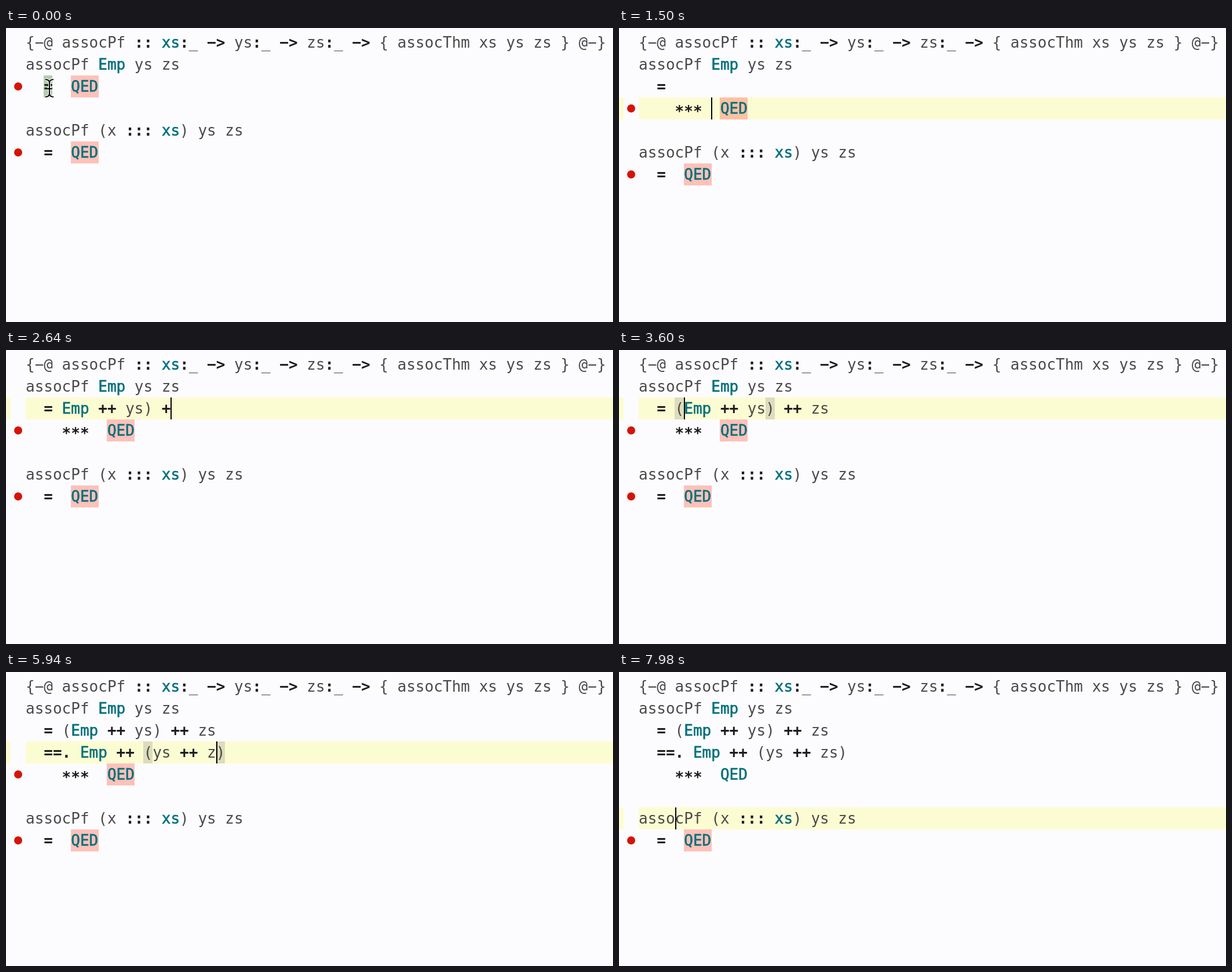
An HTML page with a canvas that plays this animation: 1048x508 px, repeating every 8000 ms.

```html
<!DOCTYPE html>
<html lang="en">
<head>
<meta charset="utf-8">
<title>Proof editing</title>
<style>
html, body { margin: 0; width: 100%; height: 100%; overflow: hidden; background: #fcfcfe; }
canvas { display: block; }
</style>
</head>
<body>
<canvas id="stage" width="1048" height="508"></canvas>
<script>
const ctx = document.getElementById('stage').getContext('2d');
const LOOP = 8000, LEFT = 34, TOP = 6, ROW = 38, CHAR = 15.653;
const FONT = '26px "DejaVu Sans Mono", monospace';
const PAPER = '#fcfcfe', CURRENT = '#fcfcd3', TEAL = '#00707c', INK = '#4a4a4a', OPERATOR = '#1c1c1c';
const START = [
  '{-@ assocPf :: xs:_ -> ys:_ -> zs:_ -> { assocThm xs ys zs } @-}',
  'assocPf Emp ys zs',
  '  =  QED',
  '',
  'assocPf (x ::: xs) ys zs',
  '  =  QED'
];
const TOKENS = /(Emp|QED|(?<=:: )xs)|(->|[:=+*.]+)|\w+|\S/g;
const FOCUS = 360, INSERT = 900, CHECKED = 7080;

// Editing steps, each a function of the editor state at a given time.
const steps = [];
const at = (time, run) => steps.push({ time, run });
const move = (time, row, col) => at(time, ed => { ed.row = row; ed.col = col; });
const insert = (ed, text) => {
  const line = ed.lines[ed.row];
  ed.lines[ed.row] = line.slice(0, ed.col) + text + line.slice(ed.col);
  ed.col++;
};
const type = (time, pace, text, autoClose) => [...text].forEach((ch, i) =>
  at(time + i * pace, ed => insert(ed, autoClose && ch === '(' ? '()' : ch)));
const newline = (time, indent) => at(time, ed => {
  const line = ed.lines[ed.row];
  ed.lines.splice(ed.row, 1, line.slice(0, ed.col), ' '.repeat(indent) + line.slice(ed.col));
  ed.row++;
  ed.col = indent;
});

move(FOCUS, 2, 3);
move(INSERT, 2, 4);
newline(1080, 4);
type(1260, 80, '*** ');
move(1740, 2, 4);
type(1860, 90, 'Emp');
type(2160, 60, ' ++ ys) ++ zs');
move(3180, 2, 4);
type(3480, 60, '(');
move(3840, 2, 21);
newline(4020, 2);
type(4260, 90, '==. ');
type(4740, 85, 'Emp ++ (ys ++ z', true);
type(6060, 60, 's');
move(6300, 3, 23);
move(6960, 4, 12);
move(7140, 5, 0);
move(7320, 6, 4);

function editorAt(time) {
  const ed = { lines: [...START], row: 2, col: 2 };
  for (const step of steps) if (step.time <= time) step.run(ed);
  return ed;
}

const x = col => LEFT + col * CHAR;
const y = row => TOP + row * ROW;
function box(color, left, top, width, height = ROW) {
  ctx.fillStyle = color;
  ctx.fillRect(Math.floor(left), top, width, height);
}

function matchBracket(line, col) {
  const pos = [col - 1, col].find(i => '()'.includes(line[i] || ' '));
  if (pos === undefined) return [];
  const dir = line[pos] === '(' ? 1 : -1;
  for (let i = pos, depth = 0; i >= 0 && i < line.length; i += dir) {
    depth += line[i] === '(' ? 1 : line[i] === ')' ? -1 : 0;
    if (depth === 0) return [pos, i];
  }
  return [];
}

function drawLine(line, row, hasError) {
  if (hasError) {
    box('rgba(255, 120, 100, 0.45)', x(line.indexOf('QED')), y(row), 48);
    ctx.fillStyle = '#d51408';
    ctx.beginPath();
    ctx.arc(21, y(row) + 19, 7, 0, 7);
    ctx.fill();
  }
  for (const { 0: word, 1: name, 2: op, index } of line.matchAll(TOKENS)) {
    const glyphs = word.replace('-', '\u2212');
    const baseline = y(row) + (word[0] === '*' ? 33 : 28);
    ctx.font = op ? 'bold ' + FONT : FONT;
    ctx.fillStyle = ctx.strokeStyle = name ? TEAL : op ? OPERATOR : INK;
    ctx.fillText(glyphs, x(index), baseline);
    if (name) {
      ctx.lineWidth = 0.6;
      ctx.strokeText(glyphs, x(index), baseline);
    }
  }
}

function drawPointer() {
  ctx.beginPath();
  for (const side of [68, 82]) {
    ctx.moveTo(side, 89);
    ctx.quadraticCurveTo(75, 89, 75, 95);
    ctx.lineTo(75, 113);
    ctx.quadraticCurveTo(75, 119, side, 119);
  }
  ctx.moveTo(71, 105);
  ctx.lineTo(79, 105);
  for (const [color, width] of [['#fff', 4], ['#000', 2]]) {
    ctx.strokeStyle = color;
    ctx.lineWidth = width;
    ctx.stroke();
  }
}

function draw(time) {
  const { lines, row, col } = editorAt(time);
  const focused = time >= FOCUS, inserting = time >= INSERT;
  box(PAPER, 0, 0, 1048, 508);
  if (focused) {
    box(CURRENT, 0, y(row), 8);
    box(CURRENT, LEFT, y(row), 1014);
  }
  if (inserting) {
    for (const i of matchBracket(lines[row], col)) box('#dddcbc', x(i), y(row), 16);
  } else {
    box(focused ? '#7f7f6b' : '#b3cdb0', x(col), y(row), focused ? 16 : 15);
  }
  lines.forEach((line, i) => {
    const fixed = time >= CHECKED && i < lines.length - 1;
    drawLine(line, i, line.includes('QED') && !fixed);
  });
  if (inserting) box('#000', Math.round(x(col)), y(row), 2);
  if (!focused) drawPointer();
}

function tick() {
  draw(performance.now() % LOOP);
  requestAnimationFrame(tick);
}
tick();
</script>
</body>
</html>
```
